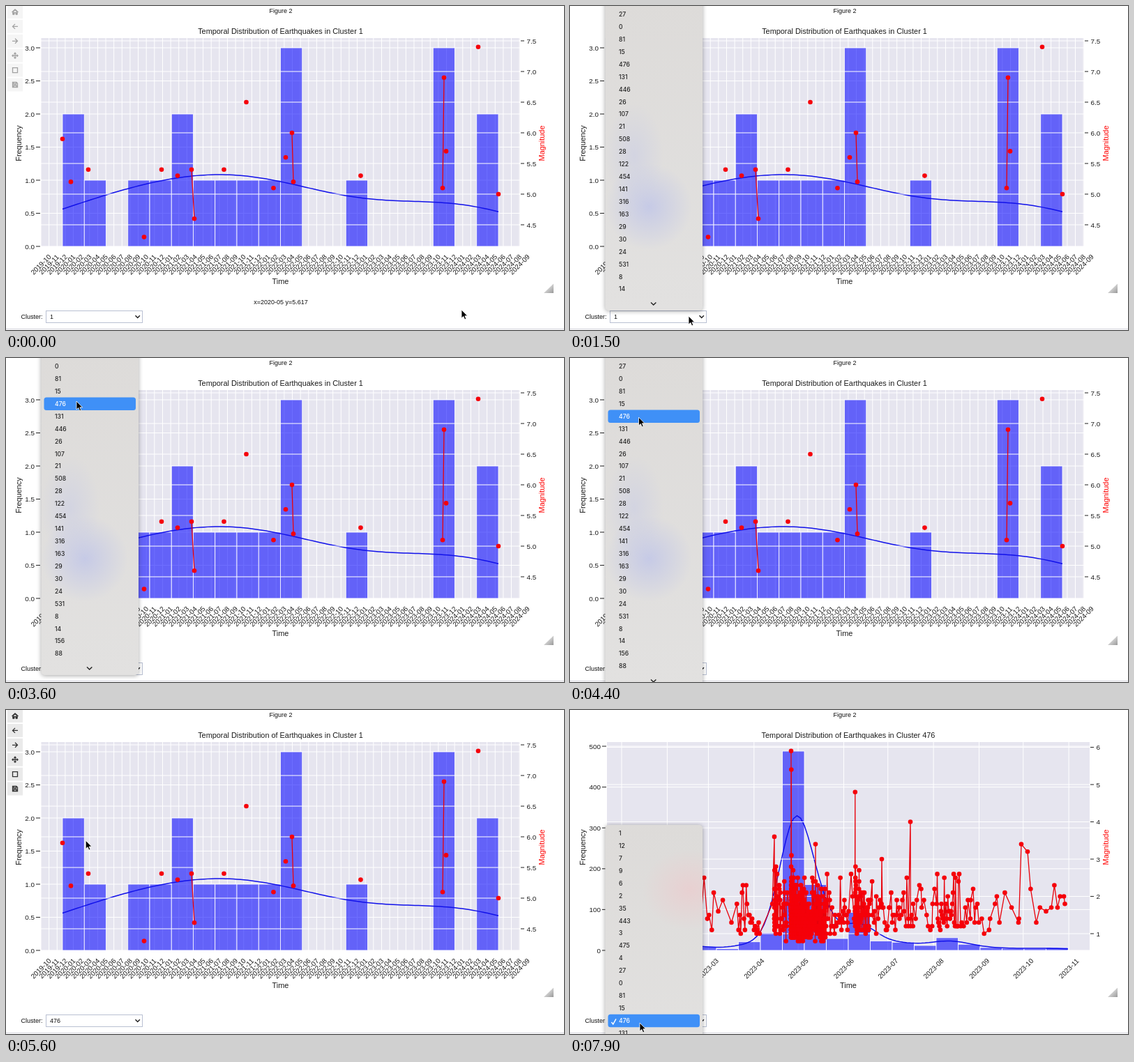
These frames come from a looping animation (800x465 px, 8000 ms). An HTML page:

```html
<!DOCTYPE html>
<html lang="en">
<head>
<meta charset="utf-8">
<title>Earthquake clusters</title>
<style>
  html, body { margin: 0; width: 100%; height: 100%; overflow: hidden; background: #fff; }
  svg { display: block; }
  text { font-family: "Liberation Sans", Arial, sans-serif; fill: #1c1c1c; }
  .tick { font-size: 9.9px; }
  .label { font-size: 10.9px; }
  .ui { font-size: 9px; fill: #111; }
  .item { font: 500 8.6px Inter, sans-serif; fill: #222; }
  .mid { text-anchor: middle; }
  .end { text-anchor: end; }
  .panel { filter: drop-shadow(0 1px 3px rgba(0, 0, 0, .35)); }
</style>
</head>
<body>
<svg id="stage" width="800" height="465" viewBox="0 0 800 465">
  <defs>
    <radialGradient id="blueGlow"><stop offset="0" stop-color="#c6cae6"/><stop offset="1" stop-color="#c6cae6" stop-opacity="0"/></radialGradient>
    <radialGradient id="pinkGlow"><stop offset="0" stop-color="#e8d0d1"/><stop offset="1" stop-color="#e8d0d1" stop-opacity="0"/></radialGradient>
    <linearGradient id="menuFill" x2="0" y2="1"><stop offset="0" stop-color="#dddbd9"/><stop offset="1" stop-color="#e2e1e0"/></linearGradient>
    <linearGradient id="gripFill" x2="1" y2="1"><stop offset=".4" stop-color="#d8d8d8"/><stop offset="1" stop-color="#999"/></linearGradient>
  </defs>
  <text class="ui mid" x="394" y="10.2">Figure 2</text>
  <g id="charts"></g>
  <path d="M785 398.500V412H771Z" fill="url(#gripFill)"/>
  <text id="readout" class="ui mid" x="394" y="428"></text>
  <g id="toolbar"></g>
  <path d="M0 463.500H800" stroke="#d3d3dd"/>
  <text class="ui" x="21.500" y="449">Cluster:</text>
  <rect x="57.500" y="437.500" width="138" height="17" fill="#fff" stroke="#b9c0d2"/>
  <text id="choice" class="ui" x="63" y="449.200"></text>
  <path d="M185.500 444.300l3.200 3.200 3.200-3.200" fill="none" stroke="#222" stroke-width="1.500"/>
  <g id="menu"></g>
  <path id="cursor" d="M0 0V12L2.800 9.500 4.700 13.800 6.700 12.900 4.900 8.800H8.600Z" fill="#000" stroke="#fff" stroke-width=".8"/>
</svg>
<script>
const LOOP = 8000, TOP = 46, BASE = 345, BINS = 20;
const $ = id => document.getElementById(id);
const range = n => Array.from({ length: n }, (_, i) => i);
const line = (x1, y1, x2, y2, color, w = 1) =>
  `<line x1="${x1}" y1="${y1}" x2="${x2}" y2="${y2}" stroke="${color}" stroke-width="${w}"/>`;
const text = (cls, x, y, str, extra = '') => `<text class="${cls}" x="${x}" y="${y}" ${extra}>${str}</text>`;
const monthName = (year, m) => `${year + Math.floor(m / 12)}-${String(m % 12 + 1).padStart(2, '0')}`;

function histogram(xs, from, to) {
  const counts = Array(BINS).fill(0);
  for (const x of xs) counts[Math.min(BINS - 1, Math.floor((x - from) / (to - from) * BINS))]++;
  return counts;
}

// Gaussian density estimate with Scott's bandwidth, in counts per bin
function density(xs, binWidth) {
  const n = xs.length, mean = xs.reduce((a, b) => a + b) / n;
  const deviation = Math.sqrt(xs.reduce((s, x) => s + (x - mean) ** 2, 0) / (n - 1));
  const h = deviation * n ** -0.2;
  return at => xs.reduce((s, x) => s + Math.exp(-(((at - x) / h) ** 2) / 2), 0) * binWidth / (h * Math.sqrt(2 * Math.PI));
}

function chart(c) {
  const { from, to, unit } = c, binWidth = (to - from) / BINS;
  const xs = c.quakes.map(q => q[0]);
  const kde = density(xs, binWidth);
  const magY = m => c.magBase - (m - c.magFirst) * c.magUnit;
  const left = range(c.leftCount).map(i => i * c.leftStep).map(v => [v.toFixed(c.digits), BASE - v * unit]);
  const right = range(c.rightCount).map(i => c.magFirst + i * c.magStep).map(m => [m.toFixed(c.digits), magY(m)]);

  let s = `<rect x="${c.x0}" y="${TOP}" width="${c.x1 - c.x0}" height="${BASE - TOP}" fill="#e6e5ef"/>`;
  for (const [x] of c.months) s += line(x, TOP, x, BASE, '#fff');
  for (const [, y] of left) s += line(c.x0, y, c.x1, y, '#fff');
  histogram(xs, from, to).forEach((n, i) => {
    if (n) s += `<rect x="${from + i * binWidth}" y="${BASE - n * unit}" width="${binWidth}" height="${n * unit}" fill="#00f" fill-opacity=".57" stroke="#fff" stroke-width=".8"/>`;
  });
  const curve = range(121).map(i => from + (to - from) * i / 120).map(x => [x, BASE - kde(x) * unit]);
  s += `<path d="M${curve.join('L')}" fill="none" stroke="#1111ea" stroke-width="1.500"/>`;
  for (const [, y] of right) s += line(c.x0, y, c.x1, y, '#fff');

  const path = c.quakes.map(([x, m, linked], i) => `${i && (c.joined || linked) ? 'L' : 'M'}${x} ${magY(m)}`).join('');
  s += `<path d="${path}" fill="none" stroke="#e8000a" stroke-width="1.300"/>`;
  for (const [x, m] of c.quakes) s += `<circle cx="${x}" cy="${magY(m)}" r="3.300" fill="#f5000a"/>`;

  for (const [v, y] of left) s += line(c.x0 - 7, y, c.x0 - 1, y, '#333', 1.1) + text('tick end', c.x0 - 9, y + 3.6, v);
  for (const [v, y] of right) s += line(c.x1 + 1, y, c.x1 + 6, y, '#333', 1.1) + text('tick', c.x1 + 9.5, y + 3.6, v);
  for (const [x, name] of c.months)
    s += text('tick mid', 0, 3.5, name, `transform="translate(${x} 371) rotate(-45)"`);
  const middle = (c.x0 + c.x1) / 2;
  return `<g id="chart${c.id}">${s}` +
    text('label mid', middle, 39.8, 'Temporal Distribution of Earthquakes in Cluster ' + c.id) +
    text('label mid', middle, 398.5, 'Time') +
    text('label mid', 0, 0, 'Frequency', 'transform="translate(21.500 197) rotate(-90)"') +
    text('label mid', 0, 0, 'Magnitude', 'transform="translate(771.500 197) rotate(-90)" style="fill:#f00"') + '</g>';
}

// Quakes are [x, magnitude, joined to the previous one]
const small = {
  id: 1, x0: 50, x1: 737, from: 81, to: 706, unit: 95, digits: 1, leftCount: 7, leftStep: .5,
  magFirst: 4.5, magStep: .5, magBase: 314, magUnit: 88, rightCount: 7,
  months: range(60).map(i => [50 + i * 11.63, monthName(2019, 9 + i)]),
  quakes: [[81, 5.9], [93, 5.2], [118, 5.4], [198, 4.3], [223, 5.4], [246, 5.3], [266, 5.4], [270, 4.6, true],
    [312.5, 5.4], [344.5, 6.5], [383.5, 5.1], [401, 5.6], [410, 6], [412, 5.2, true], [508.5, 5.3],
    [626, 5.1], [628, 6.9, true], [631, 5.7], [677, 7.4], [706, 5]]
};

let seed = 476;
const random = () => (seed = seed * 16807 % 2147483647) / 2147483647;

// Each bin gets its share of small quakes; strong shocks in busy bins trail aftershocks
function quakeSeries(from, to) {
  const perBin = [4, 6, 13, 8, 4, 21, 42, 486, 160, 29, 92, 22, 19, 12, 31, 14, 7, 4, 3, 7];
  const shocks = [[150.5, 3.7], [181, 3.3], [293, 3.6], [317, 5.9], [317.3, 5.4], [352, 3.4],
    [408.8, 4.8], [447, 3], [488, 4], [558, 2.6], [647, 3.4], [656, 3.2]];
  const width = (to - from) / BINS;
  const quakes = perBin.flatMap((n, bin) => {
    const start = from + bin * width, end = start + width;
    const shock = n > 40 && shocks.find(([x, m]) => x > start && x < end && m > 3.5);
    return range(n).map(k => {
      const u = random(), trails = shock && random() < .9;
      const x = trails ? shock[0] + (end - shock[0]) * u ** 2 : start + width * (k + u) / n;
      const low = n > 100 ? .8 : 1, high = trails ? 3.9 - 1.6 * Math.sqrt(u) : 2.6;
      const m = low + (-Math.log(random() * random()) * (n > 10 ? .33 : .42)) % (high - low);
      return [x, Math.round(m * 10) / 10];
    });
  });
  return quakes.concat(shocks).sort((a, b) => a[0] - b[0]);
}

const large = {
  id: 476, x0: 53, x1: 745, from: 84, to: 714, unit: .586, digits: 0, leftCount: 6, leftStep: 100,
  magFirst: 1, magStep: 1, magBase: 321, magUnit: 53.5, rightCount: 6,
  months: range(11).map(i => [74 + (Date.UTC(2023, i, 1) - Date.UTC(2023, 0, 1)) / 864e5 * 2.109, monthName(2023, i)]),
  quakes: quakeSeries(84, 714), joined: true
};
$('charts').innerHTML = chart(small) + chart(large);

const arrow = angle => `<path d="M4 0H-3.500M0-3.500L-3.500 0 0 3.500" transform="rotate(${angle})"/>`;
const head = angle => `<path d="M0 0H-4M-2.500-1.500L-4 0-2.500 1.500" transform="rotate(${angle})"/>`;
const icons = [
  '<path d="M-4.800 .3L0-4 4.800 .3M-3.300 .5V3.800H-1V1.200H1V3.800H3.300V.5L0-2.500Z" fill="#333" stroke-width=".9"/>',
  arrow(0), arrow(180), range(4).map(i => head(i * 90)).join(''),
  '<path d="M-3.500-3.500H3.500V3.500H-3.500Z"/>',
  '<path d="M-3.500-3.500H2L3.500-2V3.500H-3.500ZM-2-3.500V-1H1.500V-3.500M-2 3.500V1H2V3.500"/>'
];
$('toolbar').innerHTML = icons.map((icon, i) => `<g transform="translate(13 ${8.5 + i * 20.9})" fill="none" stroke="#333" stroke-width="1.300">
  <rect x="-11" y="-9.500" width="22" height="19" fill="#eaeaea" stroke="none"/>${icon}</g>`).join('');

const items = '1 12 7 9 6 2 35 443 3 475 4 27 0 81 15 476 131 446 26 107 21 508 28 122 454 141 316 163 29 30 24 531 8 14 156 88'.split(' ');
const PITCH = 17.93;
// "lead" is the item whose row sits at leadY
const menus = [
  { from: 1400, to: 2100, top: -20, lead: 11, leadY: 12, arrow: 427 },
  { from: 2100, to: 4000, top: -20, lead: 12, leadY: 12, arrow: 445 },
  { from: 4000, to: 4500, top: -20, lead: 11, leadY: 12, arrow: 463 },
  { from: 7600, to: LOOP, top: 165, lead: 0, leadY: 177, arrow: 490, checked: '476' }
];

function menuMarkup(m, cy) {
  const h = m.arrow + 10 - m.top, rowY = i => m.leadY + (i - m.lead) * PITCH;
  const hover = cy < m.arrow - 10 ? Math.round((cy - m.leadY) / PITCH) + m.lead : -1;
  const glow = (x, y, rx, ry, id) => `<ellipse cx="${x - 50}" cy="${y - m.top}" rx="${rx}" ry="${ry}" fill="url(#${id})"/>`;
  let s = `<rect class="panel" x="50.500" y="${m.top}" width="139.500" height="${h}" rx="5" fill="url(#menuFill)"/>
    <svg x="50" y="${m.top}" width="140" height="${h}" overflow="hidden">` +
    (m.checked ? glow(172, 258, 68, 58, 'pinkGlow')
      : glow(113, 288, 62, 62, 'blueGlow') + `<g opacity=".5">${glow(92, 215, 42, 75, 'blueGlow')}</g>`) + '</svg>';
  items.forEach((name, i) => {
    const y = rowY(i);
    if (y < m.top || y > m.arrow - 12) return;
    if (i === hover) s += `<rect x="54.500" y="${y - 9.2}" width="131.500" height="18.400" rx="3.500" fill="#3f90f7"/>`;
    if (name === m.checked) s += `<path d="M59.500 ${y + 2}l2.300 3 4.200-7.500" fill="none" stroke="#fff" stroke-width="1.400"/>`;
    s += text('item', 70, y + 3, name, i === hover ? 'style="fill:#fff"' : '');
  });
  return s + `<path d="M116 ${m.arrow - 1.5}l3.700 3.500 3.700-3.500" fill="none" stroke="#222" stroke-width="1.400"/>`;
}

// Moves: start, end, then the values reached
const cursorMoves = [
  [0, 0, 653, 436], [900, 1400, 170, 445], [1900, 2400, 109, 135], [2800, 3600, 101, 62],
  [3900, 4200, 98.5, 85], [5200, 6000, 130, 289.5], [6600, 7300, 100, 449]
];
const toolbarFades = [[0, 0, .45], [0, 1200, 0], [4700, 5300, 1], [6900, 7500, 0]];
const ease = k => k * k * (3 - 2 * k);

function sample(moves, t) {
  return moves.reduce((now, [from, to, ...goal]) => {
    const k = to > from ? ease(Math.max(0, Math.min(1, (t - from) / (to - from)))) : 1;
    return goal.map((v, i) => (now[i] ?? v) + (v - (now[i] ?? v)) * k);
  }, []);
}

function render(t) {
  const [cx, cy] = sample(cursorMoves, t);
  const menu = menus.find(m => t >= m.from && t < m.to);
  $('cursor').setAttribute('transform', `translate(${cx} ${cy})`);
  $('toolbar').setAttribute('opacity', sample(toolbarFades, t)[0]);
  $('chart1').style.display = t < 6000 ? '' : 'none';
  $('chart476').style.display = t < 6000 ? 'none' : '';
  $('choice').textContent = t < 4500 ? '1' : '476';
  $('readout').textContent = t < 1200 ? 'x=2020-05 y=5.617' : t >= 6000 && t < 7500 ? 'x=2023-01 y=1.612' : '';
  $('menu').innerHTML = menu ? menuMarkup(menu, cy) : '';
}

const start = performance.now();
let shown = -1;
function tick() {
  const t = Math.floor((performance.now() - start) % LOOP / 100) * 100;
  if (t !== shown) render(shown = t);
  requestAnimationFrame(tick);
}
tick();
</script>
</body>
</html>
```
